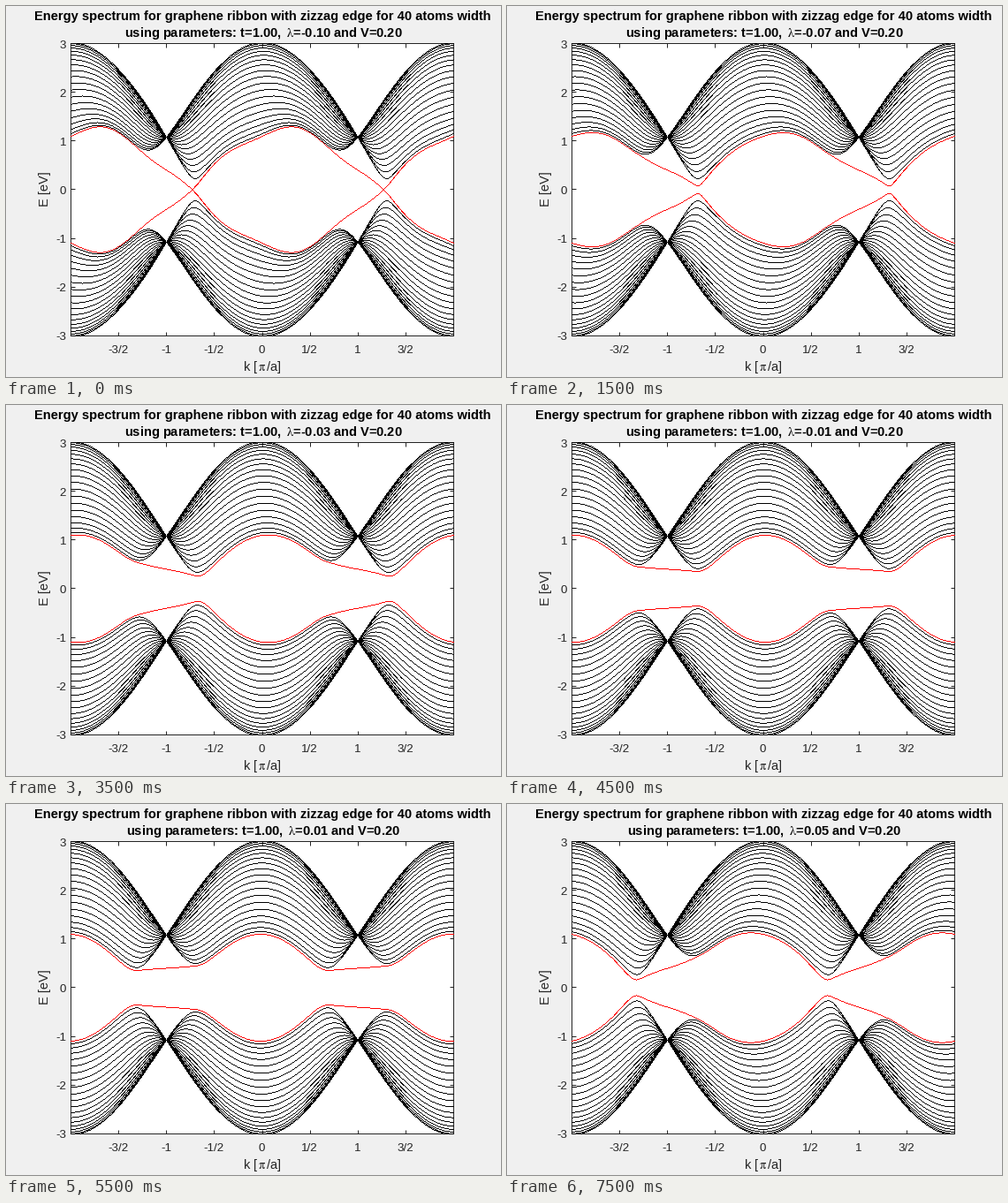
Write a matplotlib script that moves like this. It is 560 by 420 pixels and loops after 8000 ms.

```python
import matplotlib.pyplot as plt
import numpy as np
from matplotlib.animation import FuncAnimation

W, H = 560, 420
PX = 0.72  # points per pixel at 100 dpi
GREY = "#262626"
BLACK, RED = (0, 0, 0, 1), (1, 0, 0, 1)
ROWS = 20  # zigzag rows, two atoms each
T, V = 1.0, 0.2
FRAMES, INTERVAL = 16, 500

# Pixel columns and rows of the axes box
LEFT, RIGHT, TOP, BOTTOM = 73, 506, 42, 373
BOX_W, BOX_H = RIGHT - LEFT, BOTTOM - TOP

plt.rcParams.update({
    "font.family": "Liberation Sans",
    "mathtext.fontset": "stix",
    "axes.unicode_minus": False,
})


def bands(lam, k):
    """Ribbon energies, one row per k (k in units of pi/a)."""
    phase = np.pi * k
    sin, cos = np.sin(phase), np.cos(phase / 2)
    n = 2 * ROWS
    ham = np.zeros((k.size, n, n))
    for i in range(n):
        side = 1 if i % 2 == 0 else -1
        ham[:, i, i] = side * (2 * V - 4 * lam * sin)
        if i + 1 < n:
            hop = 2 * T * cos if side == 1 else T
            ham[:, i, i + 1] = ham[:, i + 1, i] = hop
        if i + 2 < n:
            hop = side * 2 * lam * sin * cos
            ham[:, i, i + 2] = ham[:, i + 2, i] = hop
    return np.linalg.eigvalsh(ham)


def draw_bands(lam):
    """Hairline curves without antialiasing, on a transparent canvas."""
    # Two samples per pixel column; the spectrum repeats after half the width
    k = np.linspace(-2, 2, 2 * BOX_W + 1)
    energy = bands(lam, k[:BOX_W])
    energy = np.concatenate([energy, energy, energy[:1]])
    y = (3 - energy) / 6 * BOX_H
    row = np.rint(y).astype(int)
    col = np.broadcast_to(np.arange(k.size)[:, None] // 2, row.shape)

    # In-between samples only close the gaps of steep curves
    keep = (row >= 0) & (row <= BOX_H)
    keep[1::2] &= np.abs(np.diff(y[::2], axis=0)) > 1

    canvas = np.zeros((BOX_H + 1, BOX_W + 1, 4))
    edge = np.isin(np.arange(2 * ROWS), (ROWS - 1, ROWS))
    for group, color in ((~edge, BLACK), (edge, RED)):
        dots = keep & group
        canvas[row[dots], col[dots]] = color
    return canvas


fig = plt.figure(figsize=(W / 100, H / 100), dpi=100, facecolor="#f0f0f0")


def label(x, y, text, size=13.333, ha="center", color=GREY, **kw):
    """Text with its baseline at pixel (x, y), measured from the top left."""
    return fig.text(x / W, 1 - y / H, text, fontsize=size * PX, ha=ha,
                    va="baseline", color=color, rotation_mode="anchor", **kw)


ax = fig.add_axes([LEFT / W, 1 - BOTTOM / H, BOX_W / W, BOX_H / H])
ax.set(xlim=(-2, 2), ylim=(-3, 3))
ax.set_xticks(np.arange(-1.5, 2, 0.5))
ax.set_yticks(range(-3, 4))
ax.tick_params(direction="in", top=True, right=True, length=4.5 * PX,
               width=PX, color=GREY, labelbottom=False, labelleft=False)
for spine in ax.spines.values():
    spine.set(linewidth=PX, edgecolor=GREY)

mid_x, mid_y = (LEFT + RIGHT) / 2, (TOP + BOTTOM) / 2
for i, name in enumerate(["-3/2", "-1", "-1/2", "0", "1/2", "1", "3/2"]):
    label(mid_x + (i - 3) * BOX_W / 8, 393, name)
for e in range(-3, 4):
    label(68, mid_y - e * BOX_H / 6 + 5.5, str(e), ha="right")
label(mid_x, 413, r"k [$\,\mathrm{\pi}\,$/a]", 14.667)
label(48, mid_y, "E [eV]", 14.667, rotation=90)

bold = dict(size=14.667, color="black", weight="bold")
label(290, 16, "Energy spectrum for graphene ribbon with zizzag edge "
      "for 40 atoms width", **bold)
params = label(291, 35, "", **bold)

curves = fig.figimage(np.zeros((BOX_H + 1, BOX_W + 1, 4)), xo=LEFT,
                      yo=H - 1 - BOTTOM, origin="upper", zorder=3)


def update(i):
    lam = (i - 10) / 100
    curves.set_data(draw_bands(lam))
    params.set_text(rf"using parameters: t={T:.2f}, $\:\mathrm{{\lambda}}$"
                    f"={lam:.2f} and V={V:.2f}")
    return curves, params


anim = FuncAnimation(fig, update, frames=FRAMES, interval=INTERVAL,
                     init_func=lambda: update(0), repeat=True, repeat_delay=0)
plt.show()
```
